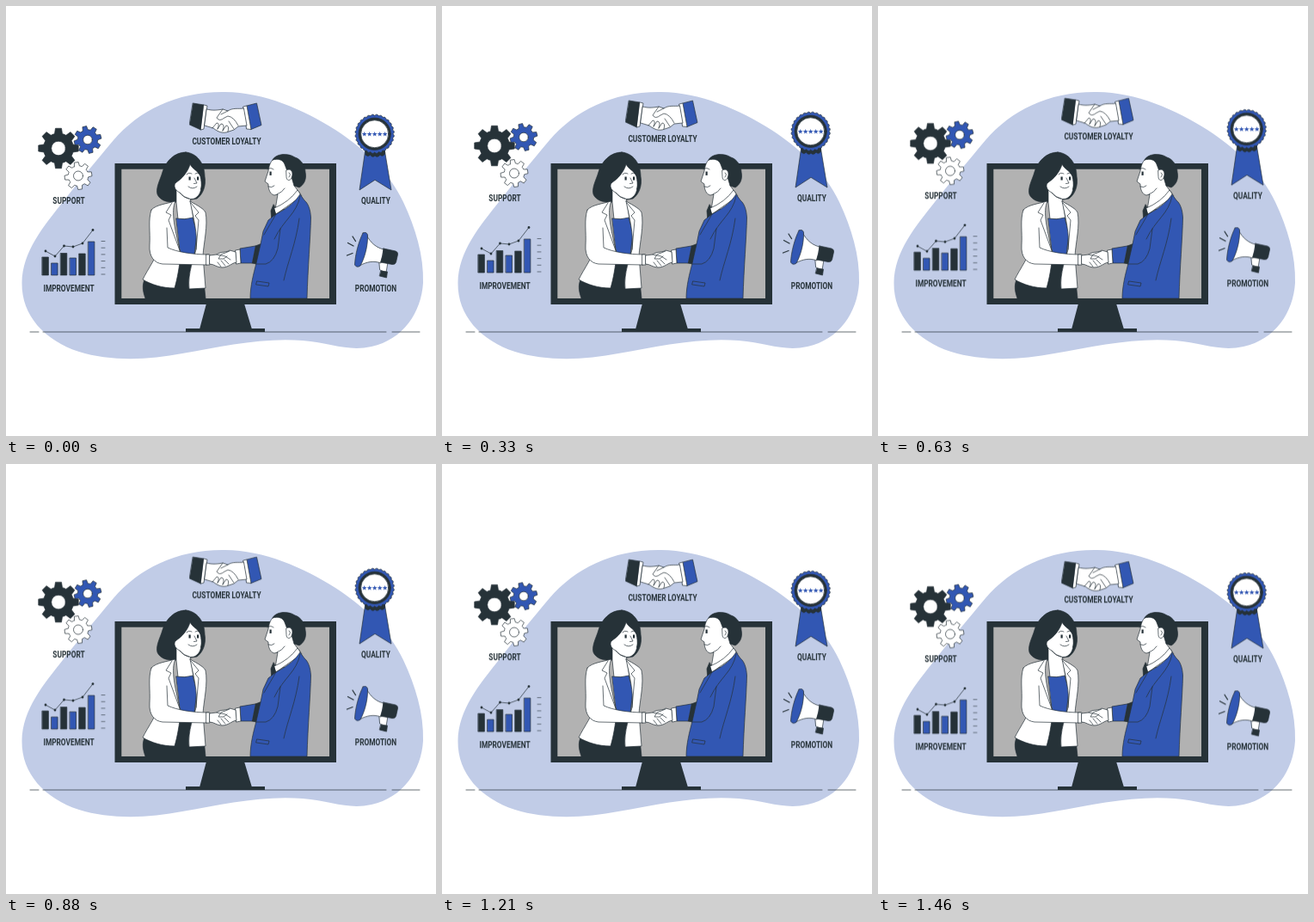
These frames come from a looping animation (500 by 500 pixels, 1.5 s). An HTML page:

```html
<!DOCTYPE html>
<html lang="en">
<head>
<meta charset="utf-8">
<title>Customer loyalty</title>
<style>
html, body { margin: 0; width: 100%; height: 100%; overflow: hidden; background: #fff; }
svg { display: block; width: 100vw; height: 100vh; }
.ln { fill: none; }
.k { fill: #263238; }
.b { fill: #3257b3; }
.w { fill: #fff; }
#art { stroke: #263238; stroke-width: .7; stroke-linejoin: round; stroke-linecap: round; }
.flat { stroke: none; }
text { font: 600 11.5px Roboto, "Open Sans", sans-serif; text-anchor: middle; fill: #263238; stroke: none; }
</style>
</head>
<body>
<svg viewBox="0 0 500 500">
<g id="art">
  <path class="flat" fill="#c1cce7" d="M255 100C300 100.500 345 120 383 144C420 168 447 196 462 228C476 258 486 290 485 322C483 356 462 388 425 396C398 402 378 392 345 389C300 385 250 396 205 404C165 412 120 413 85 402C45 389 18 360 18.500 322C19 285 44 256 66 228C88 200 105 180 125 156C155 121 200 99 255 100Z"/>
  <path class="ln" d="M28 379H38M43 379H442M449 379H481"/>

  <g id="monitor" class="flat">
    <path class="k" d="M233 346H277L286 376H225ZM209 375H301V379H209ZM126.500 183H384V347H126.500Z"/>
    <path fill="#b2b2b2" d="M134.300 189.700H376V340H134.300Z"/>
  </g>

  <g id="woman">
    <path class="k" d="M209 170C196 170 186 180 182 193C179 203 174 211 176 219C179 226 188 229 198 228L222 224C229 219 233 209 231 198C231 183 222 171 209 170Z"/>
    <path class="k" d="M162 316C157 325 160 334 162 340H232L230 320L219 286H200L180 300Z"/>
    <path class="w" d="M198 212V228L200 248H218L214 222Z"/>
    <path class="b" d="M198 247Q208 249 217 246L222 264L219 289H203Z"/>
    <path class="w" d="M197 227C191 238 197 262 203 288C202 302 199 318 196 328C182 328 169 324 159 318C165 306 176 290 178 282L169 237C175 231 186 230 197 227Z"/>
    <path class="w" d="M214 227C217 229 230 235 232 240C235 255 230 275 229 290L232 328L213 329C211 310 219 292 221 283C223 265 218 246 214 227Z"/>
    <path class="ln" d="M193 229L186 240L192 243L189 249L203 287M215 229L224 240L220 244L224 249L221 283"/>
    <path class="w" d="M169 237C165 249 168 262 167 278C166 292 173 299 182 300L234 301L236 289C216 289 199 286 188 281L187 258"/>
    <path class="w" d="M198 205C205 201 212 192 214 184C217 190 223 191 226 198C228 207 228 217 222 222C217 227 207 224 202 217C196 214 194 208 198 205Z"/>
    <path class="k flat" d="M214 181C218 190 224 191 226.500 199L228 205L226 214Q232 208 231 198L225 183Z"/>
    <path class="ln" d="M210 196Q212 193 216 195M220 195Q222 193 225 195M219 200L222 206L218.500 206.500M212 210Q217 214 222 210M202 217Q207 223 213 224"/>
    <path class="k flat" d="M212.500 198.500h2.200v4h-2.200ZM222 198.500h2.200v4h-2.200Z"/>
  </g>

  <g id="man">
    <path class="w" d="M312 177C307 181 306 186 305 192L301 204L305 207C305 213 307 219 312 220L316 219L313 237L330 236L342 218L335 209L342 190L330 174Z"/>
    <path class="k" d="M310 179C313 172 327 170 336 176C343 178 348 186 348 193C350 202 346 208 341 211L335 209L332 199L327 192L324 184C322 179 317 177 310 179Z"/>
    <path class="w" d="M326 191C331 188 335 193 332 200C330 204 326 203 326 199Z"/>
    <path class="ln" d="M304 190Q307 187 311 190M305 210Q309 212 312 209M315 219Q321 217 324 212M329 194Q332 195 329 199"/>
    <path class="k flat" d="M306.500 192.500h2.200v4.400h-2.200Z"/>
    <path class="k" d="M311 231L308 238L309 252L317 241Z"/>
    <path class="w" d="M312 235Q329 228 339 214L344 221L314 242Z"/>
    <path class="k" d="M290 279L298 276L296 301L286 299Z"/>
    <path class="b" d="M290 279L272 282L273 299L286 299Z"/>
    <path class="b" d="M342 219L347 226C351 229 354 236 354.500 246C354 270 351 304 350 340H284C284 325 288 311 291 299L296 277L299 262L305 249L314 242Q334 232 342 219Z"/>
    <path class="ln" d="M319 259L316 282Q312 297 302 300H291M314 242L300 266M342 221C338 242 323 248 312 271M341 247C337 277 328 296 323 319M292 320L306 322L305 326L291 324Z"/>
  </g>

  <g id="grip" class="w">
    <path d="M233 289L237 289V301H233ZM267 284L272 283L273 299L268 300Z"/>
    <path d="M237 290L245 289C250 285 257 287 260 284L267 286L268 298C262 299 259 304 251 304C245 304 242 300 237 300Z"/>
    <path class="ln" d="M245 289L255 291L261 295M260 285L250 289L247 294L253 294L257 291M246 298L250 303M250 296L255 302M254 295L259 300"/>
  </g>

  <g class="float">
    <path class="k" d="M217.500 113L230 115L226.500 144L213.500 138Z"/>
    <path class="b" d="M280 116L291.500 113L297 138.500L285 143.500Z"/>
    <path class="w" d="M230 115L234 116L230 143L226.500 144ZM276 117L280 116L285 143.500L280 143Z"/>
    <path class="w" d="M233.500 120C240 122 247 121 252 120L258 122C264 118 270 120 276.500 119L280 139L270 140L265 144L259 146C252 149 246 146 241 142L231 139Z"/>
    <path class="ln" d="M252 120L245 130Q248 135 254 130L258 128Q265 129 270 139M258 122L250 126M240 142L245 136Q249 136 246 143M246 143L250 137Q255 137 252 145M252 145L256 139Q260 139 258 146M259 134L265 143"/>
    <text data-at="256.500 161">CUSTOMER LOYALTY</text>
  </g>

  <g class="float" id="support">
    <text data-at="73 230">SUPPORT</text>
  </g>

  <g class="float" id="chart">
    <text data-at="73 332.500">IMPROVEMENT</text>
  </g>

  <g class="float" id="quality">
    <path class="b" d="M418 166L411 214L429 202.300L448 214L440 166Z"/>
    <path class="k" d="M418 165L418 173Q421 176 423.500 173Q426 177 429 174Q432 177 435 173Q438 176 440.500 172V165Z"/>
    <text data-at="430 230">QUALITY</text>
  </g>

  <g class="float">
    <path class="w" d="M434 296L444 298L442 310L435 307Z"/>
    <path class="k" d="M436 308L443.500 309L442.500 316L434.500 314Z"/>
    <path class="w" d="M419 266C424 276 431 281 439 283L436 299C428 296 420 297 411 302Z"/>
    <path class="k" d="M439 282L453 285Q456 286 455.500 289L453.500 298Q452.500 301 449 300.500L435.500 298Q439 290 439 282Z"/>
    <path class="b" d="M415 264Q419 262 420.500 266C421 279 417 293 412 302Q408 305 405.500 301C406 289 410 274 415 264Z"/>
    <path class="ln" stroke-width="1.300" d="M403 268L406.500 273.500M397.500 275.500L404 279M396.500 290L403 287.500"/>
    <text data-at="430 332.500">PROMOTION</text>
  </g>
</g>
</svg>
<script>
const $ = id => document.getElementById(id);

function add(parent, tag, attrs) {
  const el = document.createElementNS('http://www.w3.org/2000/svg', tag);
  for (const name in attrs) el.setAttribute(name, attrs[name]);
  return parent.appendChild(el);
}

// Closed outline from polar points [angle, radius]
function outline(cx, cy, points) {
  return 'M' + points.map(([a, r]) =>
    (cx + r * Math.sin(a)).toFixed(2) + ' ' + (cy - r * Math.cos(a)).toFixed(2)).join('L') + 'Z';
}

function gear(cx, cy, outer, inner, hole, turn, cls) {
  const points = [], step = Math.PI / 4;
  for (let i = 0; i < 8; i++) {
    const a = turn + i * step;
    points.push([a - .26, inner], [a - .15, outer], [a + .15, outer], [a + .26, inner], [a + step / 2, inner]);
  }
  add($('support'), 'path', { class: cls, d: outline(cx, cy, points) });
  add($('support'), 'circle', { class: 'w', cx, cy, r: hole });
}
gear(61, 165.5, 23.5, 17.5, 8.3, 0, 'k');
gear(95, 155.5, 16, 11.7, 5.3, -.24, 'b');
gear(84, 197.5, 16, 11.7, 5.5, -.14, 'w');

const chart = $('chart');
[292, 299, 287.5, 293, 288, 274].forEach((y, i) =>
  add(chart, 'rect', { class: i % 2 ? 'b' : 'k', x: 42.2 + 10.7 * i, y, width: 7.2, height: 313 - y }));
const trend = [[46, 285], [57, 291], [67.5, 279], [78, 280], [89, 276], [101, 260.5]];
add(chart, 'path', { class: 'ln', d: 'M' + trend.join('L') });
for (const [cx, cy] of trend) add(chart, 'circle', { class: 'k flat', cx, cy, r: 1.4 });
for (let i = 0; i < 6; i++)
  add(chart, 'path', { class: 'ln', 'stroke-width': .6, d: `M111 ${273.5 + 7.7 * i}h4` });

const badge = $('quality'), hub = { cx: 428.7, cy: 148.8 }, rim = [];
for (let i = 0; i < 144; i++) {
  const a = i * Math.PI / 72;
  rim.push([a, 21.3 + 1.5 * Math.abs(Math.sin(a * 14))]);
}
add(badge, 'path', { class: 'b', d: outline(hub.cx, hub.cy, rim) });
add(badge, 'circle', { class: 'k', ...hub, r: 18.7 });
add(badge, 'circle', { class: 'w', ...hub, r: 16 });
const star = Array.from({ length: 10 }, (_, n) => [n * Math.PI / 5, n % 2 ? 1.3 : 3.1]);
for (let i = -2; i <= 2; i++)
  add(badge, 'path', { class: 'b flat', d: outline(hub.cx + 6 * i, hub.cy + .2, star) });

// Condensed lettering, one ratio for every label
for (const label of document.querySelectorAll('text'))
  label.setAttribute('transform', `translate(${label.dataset.at}) scale(.725 1)`);

const low = 'translateY(.38px)', high = 'translateY(-6.4px)';
for (const el of document.querySelectorAll('.float'))
  el.animate({ transform: [low, high, low] }, { duration: 1500, delay: -42, iterations: Infinity });
</script>
</body>
</html>
```
